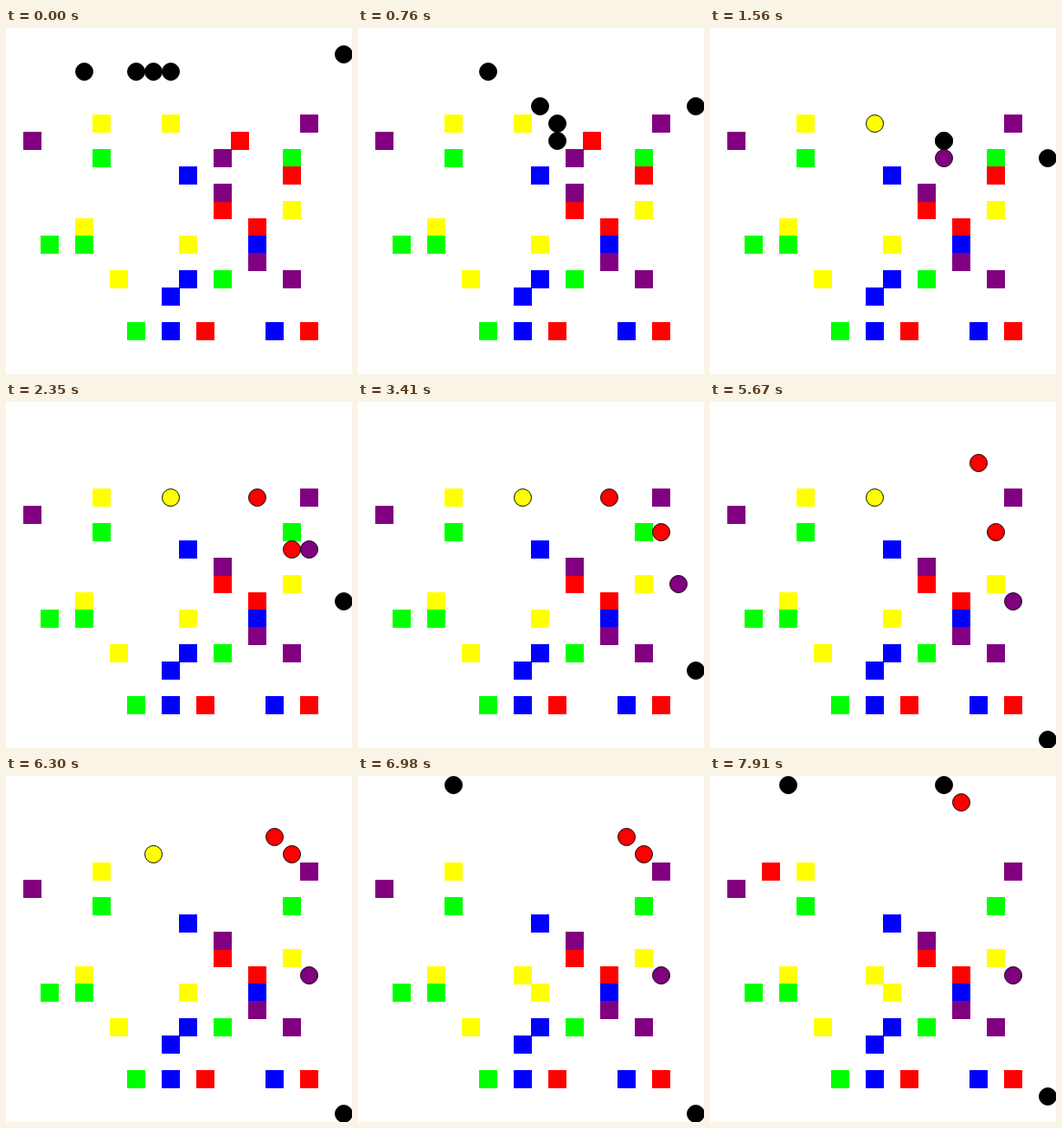
Write an HTML page with a canvas that moves like this. It is 400 by 400 pixels and loops after 8 s.

```html
<!DOCTYPE html>
<html>
<head>
<meta charset="utf-8">
<style>
html, body { margin: 0; width: 100%; height: 100%; overflow: hidden; background: #fff; }
canvas { display: block; }
</style>
</head>
<body>
<canvas id="stage" width="400" height="400"></canvas>
<script>
const ctx = document.getElementById('stage').getContext('2d');
const CELL = 20, LOOP = 8000;
const STEP = { U: [0, -1], D: [0, 1], L: [-1, 0], R: [1, 0] };

// Resting blocks as column, row pairs.
const blocks = {
  yellow: [[5, 5], [16, 10], [4, 11], [10, 12], [6, 14]],
  '#0f0': [[5, 7], [16, 7], [2, 12], [4, 12], [12, 14], [7, 17]],
  red: [[12, 10], [14, 11], [11, 17], [17, 17]],
  blue: [[10, 8], [14, 12], [10, 14], [9, 15], [9, 17], [15, 17]],
  purple: [[17, 5], [1, 6], [12, 9], [14, 13], [16, 14]]
};

// Each walk is [time of first step, time of last step, directions].
// A load waits at `from` until `pick`, then reappears at `to` after `drop`.
const walkers = [
  { start: [4, 2],
    load: { color: 'yellow', from: [9, 5], pick: 1500, to: [9, 11], drop: 6970 },
    walks: [[121, 680, 'RRR'], [860, 1500, 'RDRDD'], [6140, 6140, 'U'],
            [6300, 6890, 'LULULULU'], [7060, 7060, 'L']] },
  { start: [7, 2],
    load: { color: 'red', from: [13, 6], pick: 1500, to: [3, 5], drop: 7820 },
    walks: [[30, 760, 'RDRRD'], [860, 1500, 'RDRDR'], [1690, 1850, 'RU'],
            [5150, 5480, 'LURUR'], [7240, 7400, 'LU'], [7550, 7730, 'UU'], [7910, 7910, 'L']] },
  { start: [8, 2],
    load: { color: 'red', from: [16, 8], pick: 2250 },
    walks: [[30, 760, 'RDRDRD'], [860, 1590, 'RRDD'], [1690, 2250, 'RDRR'],
            [2670, 3040, 'UR'], [5670, 5670, 'L'], [5750, 6060, 'UUU'],
            [7320, 7320, 'L'], [7550, 7910, 'ULUU']] },
  { start: [9, 2],
    load: { color: 'purple', from: [12, 7], pick: 1040 },
    walks: [[30, 760, 'DRDRDD'], [860, 1040, 'RD'], [1200, 1590, 'RR'],
            [1690, 2300, 'RDRR'], [2580, 3310, 'DD'], [3410, 3410, 'R'], [3580, 3830, 'LD']] },
  { start: [19, 1],
    walks: [[121, 700, 'DDD'], [860, 1590, 'DDDD'], [1690, 2320, 'DDD'], [2480, 2480, 'D'],
            [2670, 3220, 'DDD'], [3500, 4090, 'DDDD'], [7730, 7730, 'U']] }
];

function position({ start, walks }, time) {
  let [col, row] = start;
  for (const [first, last, path] of walks) {
    const gap = (last - first) / Math.max(1, path.length - 1);
    [...path].forEach((dir, i) => {
      if (time < first + i * gap - 0.01) return;
      col += STEP[dir][0];
      row += STEP[dir][1];
    });
  }
  return [col, row];
}

function drawBlock([col, row], color) {
  ctx.fillStyle = color;
  ctx.fillRect(col * CELL, row * CELL, 21, 21);
}

function drawWalker([col, row], color) {
  ctx.beginPath();
  ctx.arc(col * CELL + 10.5, row * CELL + 10.5, 10, 0, 2 * Math.PI);
  ctx.fillStyle = color;
  ctx.fill();
  ctx.stroke();
}

function draw(time) {
  ctx.fillStyle = '#fff';
  ctx.fillRect(0, 0, 400, 400);

  const spots = walkers.map(walker => position(walker, time));
  const taken = new Set(spots.map(String));
  const place = (cell, color) => taken.has(String(cell)) || drawBlock(cell, color);

  for (const color in blocks) blocks[color].forEach(cell => place(cell, color));
  for (const { load } of walkers) {
    if (!load) continue;
    if (time < load.pick) place(load.from, load.color);
    else if (time >= load.drop) place(load.to, load.color);
  }

  walkers.forEach(({ load }, i) => {
    const carrying = load && time >= load.pick && !(time >= load.drop);
    drawWalker(spots[i], carrying ? load.color : 'black');
  });
}

function tick() {
  draw(performance.now() % LOOP);
  requestAnimationFrame(tick);
}
tick();
</script>
</body>
</html>
```
